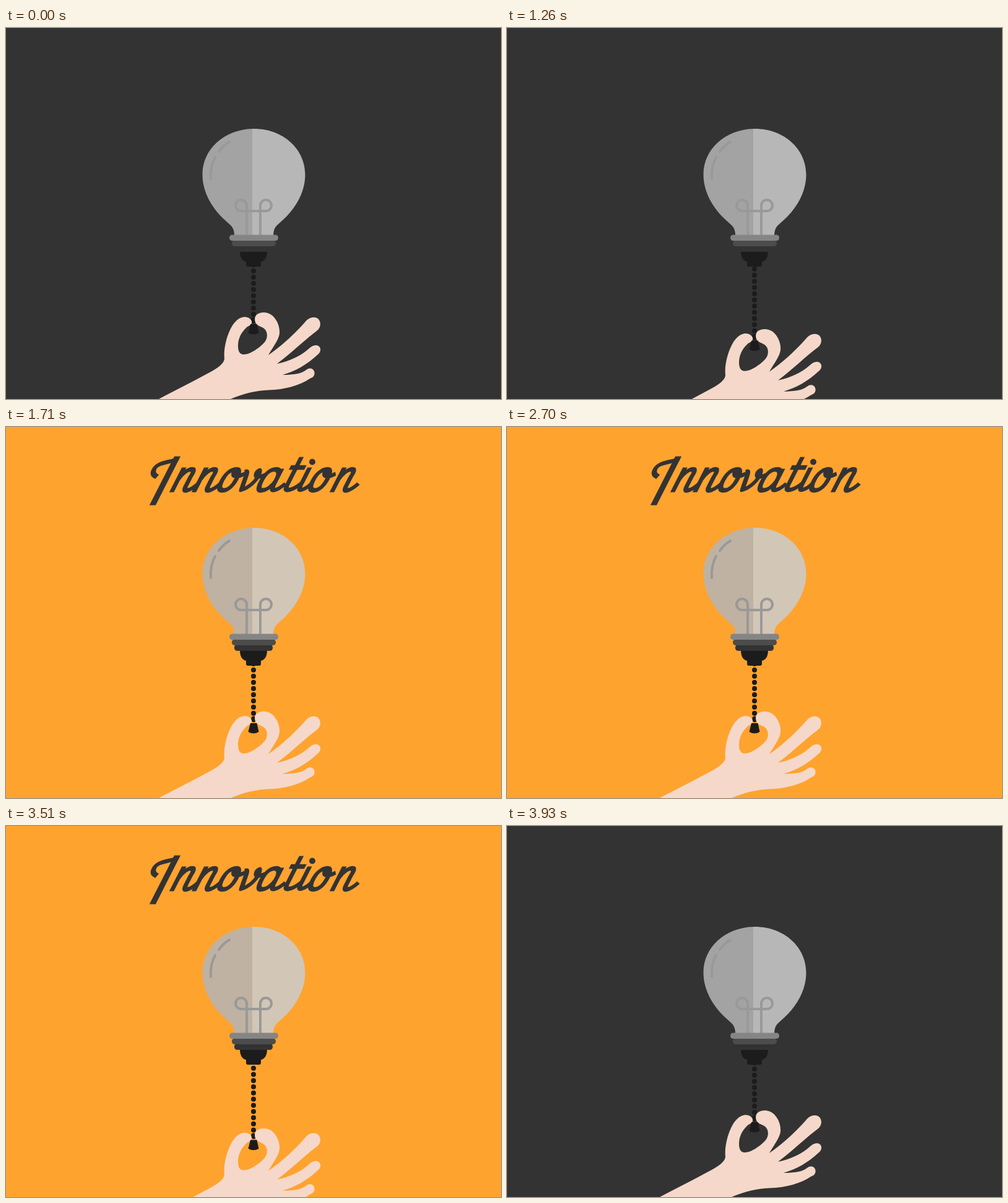
Write an HTML page that moves like this. It is 800x600 px and loops after 4500 ms.

```html
<!DOCTYPE html>
<html lang="en">
<head>
<meta charset="utf-8">
<title>Innovation</title>
<style>
  html, body { margin: 0; width: 100%; height: 100%; overflow: hidden; background: #333; }
  svg { display: block; width: 100%; height: 100%; }
  .line { fill: none; stroke: #999; stroke-width: 4; stroke-linecap: round; stroke-linejoin: round; }
  .lettering { fill: none; stroke: #333; stroke-width: 7.4; stroke-linejoin: round; }
</style>
</head>
<body>
<svg viewBox="0 0 800 600">
  <defs>
    <clipPath id="leftHalf"><path d="M300 150H398V340H300Z"/></clipPath>
    <clipPath id="rightHalf"><path d="M398 150H500V340H398Z"/></clipPath>
    <path id="glass" d="M401 163C448 163 483.500 196 483.500 237C483.500 266 468 291 449 309L438 319C434 323 432 328 432 336H369C369 328 367 323 363 319L352 309C333 291 317.500 266 317.500 237C317.500 196 353 163 401 163Z"/>
    <path id="n" d="M0 0V-40M0 -20C2 -31 8 -37 13 -37C19 -37 19 -31 18 -25V-10C18 0 27 0 36 -14"/>
    <path id="o" d="M13 -37C4 -37 0 -29 0 -19C0 -8 3 -3 10 -3C18 -3 22 -11 22 -21C22 -31 19 -37 13 -37C10 -28 20 -22 31 -30"/>
  </defs>
  <rect id="backdrop" width="800" height="600"/>

  <!-- Script lettering: upright strokes on a baseline, slanted as a whole -->
  <g class="lettering" role="img" aria-label="Innovation" transform="translate(1.500 105.500) skewX(-27)">
    <path stroke-width="10" d="M246 21V-58"/>
    <path d="M249 -55C241 -47 221 -50 219 -39C218 -31 224 -27 230 -25"/>
    <use href="#n" x="266"/>
    <use href="#n" x="302"/>
    <use href="#o" x="338"/>
    <path d="M367 -33C374 -36 373 -22 377 -4C387 -7 395 -19 392 -31C390 -39 385 -34 389 -28C392 -24 398 -25 403 -28"/>
    <path d="M425 -38V-10C426 0 435 -2 443 -14M425 -25C424 -34 420 -37 415 -37C406 -37 402 -29 402 -18C402 -7 405 -3 410 -3C418 -3 423 -10 425 -19"/>
    <path d="M447 -57V-11C447 0 459 -2 468 -14M437 -40H462"/>
    <path d="M469 -40V-11C469 0 479 -3 485 -14"/>
    <use href="#o" x="485"/>
    <use href="#n" x="525"/>
  </g>
  <circle cx="495" cy="56.500" r="5" fill="#333"/>

  <g id="pull">
    <path fill="none" stroke="#1c1c1c" stroke-width="8" stroke-linecap="round" stroke-dasharray="0 10" d="M400 473V353"/>
    <path fill="none" stroke="#1c1c1c" stroke-width="5" d="M399 468L401.500 477"/>
    <path fill="#f5d8c9" d="M247 600L302 571.500L331 556C343 549 352 543 353 535C351 517 358 494 366 481C373 470 383 465 390 468C396 470 399 475 396 479C394 482 390 482 387 486C379 494 375 504 375 514C375 523 378 528 384 528C395 528 410 517 418 508C423 502 423 493 419 488C415 483 409 483 405 479C401 475 401 466 406 463C412 459 422 459 429 464C437 470 443 482 442 494C441 504 432 515 424 529C447 513 468 493 483 476C489 468 498 466 504 470C510 475 509 485 502 490C482 505 462 525 438 543C459 539 478 529 489 519C495 513 502 511 506 515C510 519 508 525 504 528C486 545 467 555 447 561C465 561 478 559 485 553C490 549 496 550 498 555C500 561 497 565 491 567C475 578 450 585 425 585.500C405 586 385 591 363 600Z"/>
    <path fill="#1c1c1c" d="M395 479H405.500L408.500 493Q400 498 391.500 493Z"/>
  </g>

  <g opacity=".863">
    <use href="#glass" fill="#b5b5b5" clip-path="url(#leftHalf)"/>
    <use href="#glass" fill="#ccc" clip-path="url(#rightHalf)"/>
  </g>
  <path class="line" d="M331 244C330 231 332 220 338 209M344 200Q351 190 361 184"/>
  <path class="line" d="M389 335V287a9 9 0 0 0-18 0a9 9 0 0 0 9 9H420a9 9 0 0 0 9-9a9 9 0 0 0-18 0V335"/>

  <path fill="#1c1c1c" d="M378 361H422C422 371 418 377 412 378V383Q412 386 409 386H391Q388 386 388 383V378C382 377 378 371 378 361Z"/>
  <rect x="369" y="352" width="62" height="10" rx="4.500" fill="#333"/>
  <rect x="365" y="343.500" width="71" height="9.500" rx="4.500" fill="#4c4c4c"/>
  <rect x="361" y="334.500" width="79" height="9.500" rx="4.500" fill="#858585"/>
</svg>
<script>
  const LOOP = 4500, DOWN = 300, UP = 390, REACH = 29.5;
  const PULLS = [1020, 3240];
  const backdrop = document.getElementById("backdrop");
  const pull = document.getElementById("pull");

  const ease = p => (1 - Math.cos(Math.PI * Math.min(1, Math.max(0, p)))) / 2;
  const offset = t => REACH * (ease(t / DOWN) - ease((t - DOWN) / UP));

  function draw() {
    const t = performance.now() % LOOP;
    const y = PULLS.reduce((sum, start) => sum + offset(t - start), 0);
    const lit = t >= PULLS[0] + DOWN && t < PULLS[1] + DOWN;
    backdrop.setAttribute("fill", lit ? "#ffa32f" : "#333");
    pull.setAttribute("transform", `translate(0 ${y})`);
    requestAnimationFrame(draw);
  }
  draw();
</script>
</body>
</html>
```
